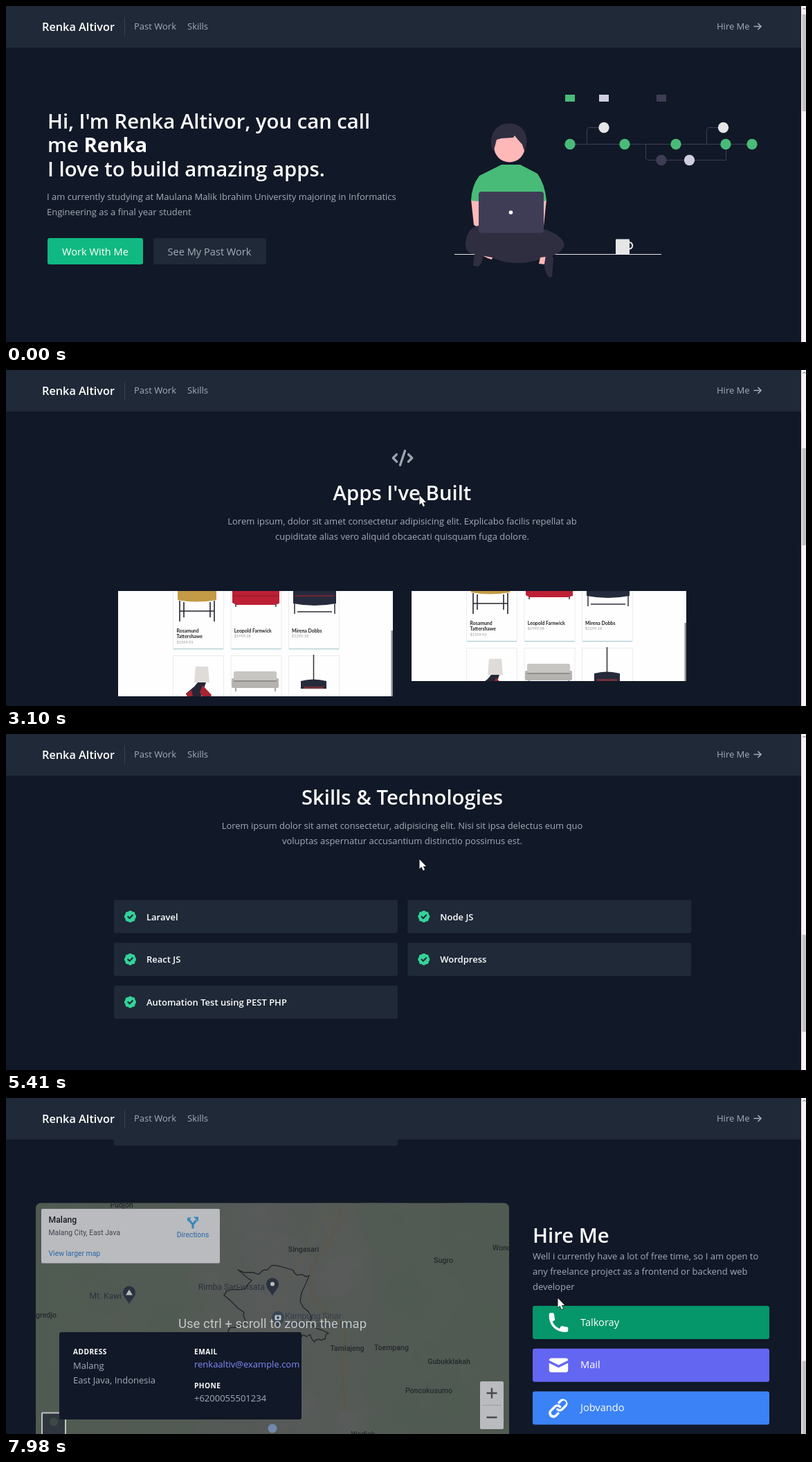
Write an HTML page with a canvas that moves like this. It is 1156 by 485 pixels and loops after 8000 ms.

```html
<!DOCTYPE html>
<html lang="en">
<head>
<meta charset="utf-8">
<title>Portfolio scroll</title>
<style>
html, body { margin: 0; width: 100%; height: 100%; overflow: hidden; background: #111827; }
canvas { display: block; width: 1156px; height: 485px; }
</style>
</head>
<body>
<canvas id="stage" width="1156" height="485"></canvas>
<script>
const ctx = document.getElementById('stage').getContext('2d');
const LOOP = 8000;
const SANS = '"Open Sans", "Noto Sans", sans-serif';
const MAP_FONT = 'Roboto, sans-serif';
const BG = '#111827', PANEL = '#1f2937', GRAY = '#a5acb8', GREEN = '#10b981';
const LEAF = '#48bb78', SKIN = '#ffb8b8', INK = '#2f2e41', SLATE = '#3f3d56', PALE = '#e6e6e6';
const BODY = 13, TITLE = 29.3, BUTTON = 14.6;

const ICONS = {
  code: 'M12.3 3a1 1 0 01.65 1.3l-4 12a1 1 0 11-1.9-.63l4-12a1 1 0 011.25-.67zM5.7 6.3a1 1 0 010 1.4L3.4 10l2.3 2.3a1 1 0 11-1.4 1.4l-3-3a1 1 0 010-1.4l3-3a1 1 0 011.4 0zm8.6 0a1 1 0 011.4 0l3 3a1 1 0 010 1.4l-3 3a1 1 0 11-1.4-1.4L16.6 10l-2.3-2.3a1 1 0 010-1.4z',
  chip: 'M13 7H7v6h6V7zM7 2a1 1 0 012 0v1h2V2a1 1 0 112 0v1h2a2 2 0 012 2v2h1a1 1 0 110 2h-1v2h1a1 1 0 110 2h-1v2a2 2 0 01-2 2h-2v1a1 1 0 11-2 0v-1H9v1a1 1 0 11-2 0v-1H5a2 2 0 01-2-2v-2H2a1 1 0 110-2h1V9H2a1 1 0 010-2h1V5a2 2 0 012-2h2V2zM5 5h10v10H5V5z',
  phone: 'M2 3a1 1 0 011-1h2.15a1 1 0 01.99.84l.74 4.43a1 1 0 01-.54 1.06l-1.55.77a11 11 0 006.1 6.1l.78-1.54a1 1 0 011.06-.54l4.43.74a1 1 0 01.84.98V17a1 1 0 01-1 1h-2C7.8 18 2 12.2 2 5V3z',
  mail: 'M2 5.9L10 9.9l8-4A2 2 0 0016 4H4a2 2 0 00-2 1.9zM18 8.1l-8 4-8-4V14a2 2 0 002 2h12a2 2 0 002-2V8.1z',
  link: 'M12.6 4.6a2 2 0 112.8 2.8l-3 3a2 2 0 01-2.8 0 1 1 0 00-1.4 1.4 4 4 0 005.6 0l3-3a4 4 0 00-5.6-5.6l-1.5 1.5a1 1 0 101.4 1.4l1.5-1.5zm-5 5a2 2 0 012.8 0 1 1 0 101.4-1.4 4 4 0 00-5.6 0l-3 3a4 4 0 105.6 5.6l1.5-1.5a1 1 0 10-1.4-1.4l-1.5 1.5a2 2 0 11-2.8-2.8l3-3z'
};

// start, end, number of steps, scroll offset reached
const SCROLLS = [
  [2210, 2470, 4, 96], [2550, 2970, 7, 385], [3170, 3310, 3, 481], [3650, 4270, 9, 770],
  [4670, 5140, 8, 1058], [5480, 5690, 4, 1248], [6150, 6500, 6, 1400]
];
const CURSOR = [
  [720, 893, 385], [790, 820, 348], [860, 764, 322],
  [1260, 754, 313], [1330, 706, 272], [1400, 640, 215], [1470, 597.5, 181],
  [7710, 626, 194], [7780, 700, 236], [7850, 766, 292], [7920, 794, 308], [7980, 797.5, 289]
];

const smooth = p => p * p * (3 - 2 * p);

function stepped(t, t0, t1, n) {
  if (t < t0) return 0;
  return Math.min(1, (Math.floor((t - t0) / (t1 - t0) * (n - 1) + 1e-6) + 1) / n);
}

function scrollAt(t) {
  let y = 0;
  for (const [t0, t1, n, to] of SCROLLS) y += (to - y) * smooth(stepped(t, t0, t1, n));
  return Math.round(y);
}

function seeded(seed) {
  return () => (seed = (seed * 16807) % 2147483647) / 2147483647;
}

function text(str, x, y, size, color, weight = 400, align = 'left', family = SANS) {
  ctx.font = `${weight} ${size}px ${family}`;
  ctx.textAlign = align;
  ctx.fillStyle = color;
  ctx.fillText(str, x, y);
}

function box(x, y, w, h, color, r = 0) {
  ctx.fillStyle = color;
  ctx.beginPath();
  ctx.roundRect(x, y, w, h, r);
  ctx.fill();
}

function dot(x, y, r, color) {
  ctx.fillStyle = color;
  ctx.beginPath();
  ctx.arc(x, y, r, 0, 7);
  ctx.fill();
}

function shape(d, color) {
  ctx.fillStyle = color;
  ctx.fill(new Path2D(d), 'evenodd');
}

function line(d, color, width = 1) {
  ctx.strokeStyle = color;
  ctx.lineWidth = width;
  ctx.stroke(new Path2D(d));
}

function icon(name, cx, cy, color, scale = 1.714) {
  ctx.save();
  ctx.translate(cx - 10 * scale, cy - 10 * scale);
  ctx.scale(scale, scale);
  shape(ICONS[name], color);
  ctx.restore();
}

function drawNav() {
  box(0, 0, 1149, 60, PANEL);
  text('Renka Altivor', 52, 36, 16.3, '#fff', 600);
  box(171, 16, 1, 27, '#374151');
  text('Past Work', 185, 34, BODY, GRAY);
  text('Skills', 262, 34, BODY, GRAY);
  text('Hire Me', 1027, 34, BODY, GRAY);
  line('M1080.5 29.5H1091M1086.5 25L1091 29.5L1086.5 34', GRAY, 1.6);
}

function drawScrollbar(y) {
  box(1149, 0, 7, 485, '#fbf0f3');
  box(1150.5, 12 + y * 0.2625, 5.5, 140, '#c4bfc3');
  line('M1151.5 5L1153.5 3L1155.5 5', '#555');
}

function drawHero() {
  text("Hi, I'm Renka Altivor, you can call", 60, 177, TITLE, '#fff', 600);
  text('me ', 60, 211, TITLE, '#fff', 600);
  const w = ctx.measureText('me ').width;
  text('Renka', 60 + w, 211, TITLE, '#fff', 700);
  text('I love to build amazing apps.', 60, 245.5, TITLE, '#fff', 600);
  text('I am currently studying at Maulana Malik Ibrahim University majoring in Informatics', 59, 280, BODY, GRAY);
  text('Engineering as a final year student', 59, 302, BODY, GRAY);
  box(60, 335, 138, 38, GREEN, 3);
  text('Work With Me', 129, 360, BUTTON, '#fff', 400, 'center');
  box(213, 335, 163, 38, PANEL, 3);
  text('See My Past Work', 294, 360, BUTTON, GRAY, 400, 'center');
  drawGraph();
  drawPerson();
}

function drawGraph() {
  box(808, 128, 14, 10, LEAF);
  box(857, 128, 14, 10, '#d0cde1');
  box(940, 128, 14, 10, SLATE);
  line('M815 199.5H1078M839.5 199V180Q839.5 175.5 844 175.5H864M1012.5 199V180Q1012.5 175.5 1017 175.5H1036M924.5 199V218Q924.5 222.5 929 222.5H1040.5V199', SLATE);
  for (const x of [815, 894, 968, 1040, 1078]) dot(x, 199.5, 7.7, LEAF);
  dot(864, 175.5, 7.7, PALE);
  dot(1036.5, 175.5, 7.7, PALE);
  dot(947, 222.5, 7.7, SLATE);
  dot(987.5, 222.5, 7.7, '#d0cde1');
}

function drawPerson() {
  box(648, 358, 299, 1, PALE);
  box(881, 336.5, 20, 22, PALE, 1);
  line('M900 341.5C907 340 907 351.5 900 350.5', PALE, 2);
  dot(727.5, 203, 22.5, SKIN);
  shape('M703 208C699 197 701 184 708 177C714 170 724 169 729 169.5C742 170 752 180 752.5 193C752.5 200 751 206 749 209L746 200L739 192L735 187L733 190L716 191L709 193L705 208Z', INK);
  shape('M672 279L683 279L683 320L676 316ZM773 279H781L777 318H771Z', SKIN);
  shape('M716 229H743L768 242Q779 258 781 281L771 283V290H684V282L672 281Q673 259 684 245Z', LEAF);
  shape('M683 317C668 321 666 330 664 343C664 352 668 357 676 358L700 362C720 372 745 374 770 366C790 362 803 356 807 346C806 335 795 328 778 322L775 326H685Z', INK);
  shape('M678 354L690 358L689 364Q687 374 682 376L675 375Q676 362 678 354Z', INK);
  shape('M689 360.5L703 363L702 366Q695 364 689 360.5Z M772 363L780 362L779 373L770 372Z', SKIN);
  shape('M780 360Q789 358 791 364L789 391L785 392Q778 385 778 372Z', INK);
  box(683, 268, 94, 59.5, SLATE, 4);
  dot(729.5, 298, 2.8, '#fff');
}

function heading(name, iconY, title, lines) {
  icon(name, 573, iconY, '#9ca3af');
  text(title, 572.5, iconY + 61, TITLE, '#fff', 600, 'center');
  lines.forEach((s, i) => text(s, 572.5, iconY + 95.5 + i * 22.3, BODY, GRAY, 400, 'center'));
}

// shop page shown inside each app card
function drawShop(x, y, h, shift, bar) {
  ctx.save();
  ctx.beginPath();
  ctx.rect(x, y, 397, h);
  ctx.clip();
  box(x, y, 397, h, '#fefefe');
  ctx.translate(x, y + shift);
  for (const tx of [79, 162.5, 246]) {
    ctx.strokeStyle = '#ececee';
    ctx.lineWidth = 1;
    ctx.strokeRect(tx + 0.5, -60.5, 73, 144);
    ctx.strokeRect(tx + 0.5, 93.5, 73, 144);
    box(tx + 1, 83, 72, 1.2, '#a9cbd3');
  }
  shape('M86 -8H142V13Q114 18 86 13Z', '#c39a45');
  line('M89 14V44M139 14V44M95 16V38M133 16V38M89 29H139', '#25252c', 1.6);
  shape('M165 -6H233V18L226 20H171L165 17Z', '#bd2035');
  line('M166 7H232', '#8e1628');
  line('M170 19V23M228 19V23', '#333', 1.5);
  shape('M253 -6H315V18Q284 24 253 18Z', '#262a3d');
  line('M256 7H312', '#8e2430', 1.5);
  line('M255 18V33M313 18V33M259 30H309', '#30303a', 1.5);

  const names = [['Rosamund', 'Tattershawe', '$1599.93'], ['Leopold Farnwick', '$1999.38'], ['Mirena Dobbs', '$1299.18']];
  names.forEach((rows, i) => rows.forEach((s, j) => {
    const price = s[0] === '$';
    text(s, 84.5 + i * 83.3, 59.5 + j * 8.7 - (price ? 1 : 0), price ? 5.6 : 6.9,
      price ? '#999' : '#222', price ? 400 : 700, 'left', 'Lato, sans-serif');
  }));

  shape('M112 109H130L132 132H110Z', '#dedbd9');
  shape('M115 132H127L120 152L113 157H104L98 148L110 138Z', '#252637');
  shape('M122 136L135 150L133 155H123L118 146ZM98 148L106 143L108 152L101 155Z', '#a52531');
  box(164, 126, 68, 14, '#b5b3b0', 2);
  box(167, 116, 62, 13, '#c8c6c3', 2);
  line('M170 140V145M227 140V145M167 130H229', '#6c6967', 1.2);
  line('M282.5 92V130', '#333', 1.5);
  shape('M264 130Q282 125 301 130V141H264Z', '#262a3b');
  box(268, 138, 29, 3, '#74303a');
  ctx.restore();
  if (bar) box(x + 394.5, y + 57 + shift, 2.5, h - 57 - shift, '#8f8f8f');
}

function drawApps(t) {
  heading('code', 512, "Apps I've Built", [
    'Lorem ipsum, dolor sit amet consectetur adipisicing elit. Explicabo facilis repellat ab',
    'cupiditate alias vero aliquid obcaecati quisquam fuga dolore.'
  ]);
  const inner = t < 3450 ? 0 : t < 4480 ? -10 : -13;
  const bar = t < 3450;
  drawShop(162, 704, 152, inner, bar);
  drawShop(586, 704, 130, inner - 11, bar);
  drawShop(162, 883.5, 130.5, inner - 11, bar);
}

function badge(x, y) {
  const color = '#34d399';
  dot(x, y, 7, color);
  for (let i = 0; i < 8; i++) dot(x + 5.3 * Math.cos(i * Math.PI / 4), y + 5.3 * Math.sin(i * Math.PI / 4), 3.2, color);
  ctx.lineCap = 'round';
  line(`M${x - 3.2} ${y + 0.2}L${x - 0.9} ${y + 2.4}L${x + 3.3} ${y - 2}`, PANEL, 2.1);
  ctx.lineCap = 'butt';
}

function drawSkills() {
  heading('chip', 1099, 'Skills & Technologies', [
    'Lorem ipsum dolor sit amet consectetur, adipisicing elit. Nisi sit ipsa delectus eum quo',
    'voluptas aspernatur accusantium distinctio possimus est.'
  ]);
  ['Laravel', 'Node JS', 'React JS', 'Wordpress', 'Automation Test using PEST PHP'].forEach((s, i) => {
    const x = 156 + (i % 2) * 424.3, y = 1297.5 + (i >> 1) * 61.7;
    box(x, y, 410, 48, PANEL, 3);
    badge(x + 23.5, y + 24);
    text(s, x + 47, y + 29, BODY, '#fff', 600);
  });
}

function pin(x, y, color, glyph) {
  shape(`M${x} ${y + 13}C${x - 3} ${y + 6} ${x - 9} ${y + 3} ${x - 9} ${y - 4}A9 9 0 0 1 ${x + 9} ${y - 4}C${x + 9} ${y + 3} ${x + 3} ${y + 6} ${x} ${y + 13}Z`, color);
  if (glyph === 'peak') shape(`M${x - 5} ${y}L${x} ${y - 8}L${x + 5} ${y}Z`, '#b9bdb9');
  else if (glyph === 'photo') { box(x - 4.5, y - 7, 9, 7, '#b9c5cc', 1); dot(x, y - 3.5, 2, color); }
  else dot(x, y - 4, 3, '#b9bdb9');
}

// polyline roughened with two jittered points per segment
function jagged(points, amp, rnd) {
  let d = '';
  points.forEach(([x, y], i) => {
    const [nx, ny] = points[i + 1] || [x, y];
    d += `${i ? 'L' : 'M'}${x} ${y}`;
    for (const k of [1 / 3, 2 / 3]) {
      d += `L${x + (nx - x) * k + (rnd() - 0.5) * amp} ${y + (ny - y) * k + (rnd() - 0.5) * amp}`;
    }
  });
  return d;
}

function drawTerrain(dim) {
  const rnd = seeded(4711);
  const land = ctx.createLinearGradient(43, 0, 727, 0);
  land.addColorStop(0, '#9bb19f');
  land.addColorStop(0.5, '#a8aeaa');
  land.addColorStop(1, '#9cb0a0');
  box(43, 0, 684, 420, land);
  for (let i = 0; i < 90; i++) {
    const x = 43 + rnd() * 684, y = rnd() * 400, r = 15 + rnd() * 40;
    const edge = Math.abs(x - 400) > 120;
    ctx.fillStyle = edge ? 'rgba(146,176,153,.15)' : 'rgba(178,180,183,.15)';
    ctx.beginPath();
    ctx.ellipse(x, y, r, r * 0.6, rnd() * 3, 0, 7);
    ctx.fill();
  }
  ctx.globalAlpha = 1 - 0.75 * dim;
  for (let i = 0; i < 26; i++) {
    let x = 43 + rnd() * 684, y = rnd() * 340, a = rnd() * 6.3, d = `M${x} ${y}`;
    for (let k = 0; k < 14; k++) {
      a += (rnd() - 0.5) * 1.1;
      d += `L${x += 11 * Math.cos(a)} ${y += 11 * Math.sin(a)}`;
    }
    line(d, '#b0b6b3');
  }
  const city = ctx.createRadialGradient(385, 150, 20, 385, 150, 65);
  city.addColorStop(0, 'rgba(178,182,188,.9)');
  city.addColorStop(1, 'rgba(178,182,188,0)');
  box(310, 80, 150, 150, city);
  line('M468 0L461 18L440 48L431 74L415 101L400 133L388 168L378 200', '#c2b06c', 2.6);
  line('M483 0Q483 24 477 36C466 62 446 78 441 98C436 126 446 140 452 147C464 162 490 170 491 197C491 214 484 222 486 240L490 300', '#c09a64', 4);
  line('M412 103L440 107M461 18L480 26', '#c2b06c', 2);
  ctx.globalAlpha = 1;
  const border = [[322, 187], [324, 180], [345, 174], [344, 158], [315, 133], [320, 127], [346, 124], [355, 112],
    [336, 97], [365, 103], [384, 90], [412, 96], [420, 104], [438, 105], [425, 142], [440, 162], [440, 174],
    [466, 188], [455, 198], [446, 201], [440, 190], [426, 192]];
  line(jagged(border, 5, rnd), dim > 0.5 ? '#39404f' : '#c44545', 1.2);
}

function drawLabels(dim) {
  const label = (s, x, y, color = '#252a2c', align = 'center') => text(s, x, y, 10.6, color, 500, align, MAP_FONT);
  label('Pudjon', 167, 6.5);
  label('Singasari', 430, 70);
  label('Sugro', 632, 86);
  label('Wonosari', 703, 68, '#252a2c', 'left');
  label('gredjo', 43, 165, '#252a2c', 'left');
  label('Tamiajeng', 493, 213);
  label('Toempang', 557, 212);
  label('Gubukklakah', 640, 232);
  label('Poncokusumo', 611, 274);
  label('Wadjak', 516, 337);
  const place = (s, x, y, color, align) => text(s, x, y, 12, color, 400, align, MAP_FONT);
  const mute = dim > 0.5;
  const poi = mute ? '#2c323d' : '#50575c', spot = mute ? '#343f4b' : '#2b7187';
  place('Mt. Kawi', 167, 138, poi, 'right');
  place('Rimba Sari-wisata', 374, 125.5, poi, 'right');
  place('Kampung Sinar', 403, 167, spot, 'left');
  place('Embun Lestira Damai', 403, 179, spot, 'left');
  pin(178, 133, mute ? '#2a3140' : '#5e6467', 'peak');
  pin(385, 121, mute ? '#2a3140' : '#5e6467');
  pin(393, 169, mute ? '#3b4552' : '#2b86a4', 'photo');
}

function drawMap(dim) {
  ctx.save();
  ctx.translate(0, 1551.5);
  ctx.save();
  ctx.beginPath();
  ctx.roundRect(43, 0, 684, 440, 8);
  ctx.clip();
  drawTerrain(dim);
  box(43, 0, 684, 440, `rgba(0,0,0,${0.49 * dim})`);
  drawLabels(dim);
  ctx.globalAlpha = dim;
  text('Use ctrl + scroll to zoom the map', 385, 180.5, 18.6, '#c3c8c8', 400, 'center', MAP_FONT);
  ctx.globalAlpha = 1;

  const card = '#b9bbbf', blue = '#2c66a8';
  box(51, 8.5, 258, 78.5, card, 2);
  text('Malang', 61.5, 28, 12.2, '#191c22', 500, 'left', MAP_FONT);
  text('Malang City, East Java', 61.5, 46, 10.4, '#41464d', 400, 'left', MAP_FONT);
  text('View larger map', 61.5, 76, 10.4, blue, 400, 'left', MAP_FONT);
  text('Directions', 270, 49.5, 10.4, blue, 400, 'center', MAP_FONT);
  line('M270 37V31L264 24M270 31L275 25', '#3988b8', 3.2);
  shape('M271 20H278V27ZM262 21H268L262 27Z', '#3988b8');

  box(685, 257.5, 34, 69, card, 2);
  box(689, 291.5, 26, 1, '#9a9ca0');
  line('M694.5 274.5H709.5M702 267V282M694.5 309.5H709.5', '#464a50', 2.4);
  box(51, 302, 36, 36, '#c0c2c4', 2);
  box(53, 304, 32, 34, '#30363f');
  dot(69, 316, 6, '#3c4a45');
  dot(385, 325.5, 6.5, '#7388ab');
  ctx.restore();

  box(77, 186.5, 350, 126, BG, 3);
  ctx.letterSpacing = '0.5px';
  text('ADDRESS', 97, 218, 10.1, '#fff', 700);
  text('EMAIL', 272, 218, 10.1, '#fff', 700);
  text('PHONE', 272, 267.5, 10.1, '#fff', 700);
  ctx.letterSpacing = '0px';
  text('Malang', 97, 239.5, BODY, GRAY);
  text('East Java, Indonesia', 97, 260, BODY, GRAY);
  text('renkaaltiv@example.com', 272, 237, BODY, '#818cf8');
  text('+6200055501234', 272, 286.5, BODY, GRAY);
  ctx.restore();
}

function drawHire(t) {
  text('Hire Me', 761, 1608.5, TITLE, '#fff', 600);
  ['Well i currently have a lot of free time, so I am open to', 'any freelance project as a frontend or backend web', 'developer']
    .forEach((s, i) => text(s, 761, 1632.5 + i * 22.3, BODY, GRAY));
  const hover = t >= 7920;
  [['Talkoray', 'phone', hover ? '#059669' : GREEN], ['Mail', 'mail', '#6366f1'], ['Jobvando', 'link', '#3b82f6']]
    .forEach(([s, glyph, color], i) => {
      const y = 1700 + i * 61.7;
      box(761, y, 342, 48, color, 3);
      icon(glyph, 798.5, y + 24, '#fff');
      text(s, 830, y + 28.5, BUTTON, '#fff');
    });
}

function drawCursor(t) {
  const spot = CURSOR.filter(c => c[0] <= t).pop();
  if (!spot) return;
  ctx.save();
  ctx.translate(spot[1], spot[2]);
  const arrow = 'M0 0V13.5L3 10.8L5.2 16L7.6 15L5.4 10H9.6Z';
  line(arrow, '#111', 1.2);
  shape(arrow, '#fff');
  ctx.restore();
}

function draw(t) {
  const y = scrollAt(t);
  box(0, 0, 1156, 485, BG);
  ctx.save();
  ctx.translate(0, -y);
  if (y < 400) drawHero();
  if (y < 1000) drawApps(t);
  drawSkills();
  if (y > 1000) {
    drawMap(stepped(t, 7040, 7310, 5));
    drawHire(t);
  }
  ctx.restore();
  drawNav();
  drawScrollbar(y);
  drawCursor(t);
}

const start = performance.now();
function tick() {
  draw((performance.now() - start) % LOOP);
  requestAnimationFrame(tick);
}
tick();
</script>
</body>
</html>
```
